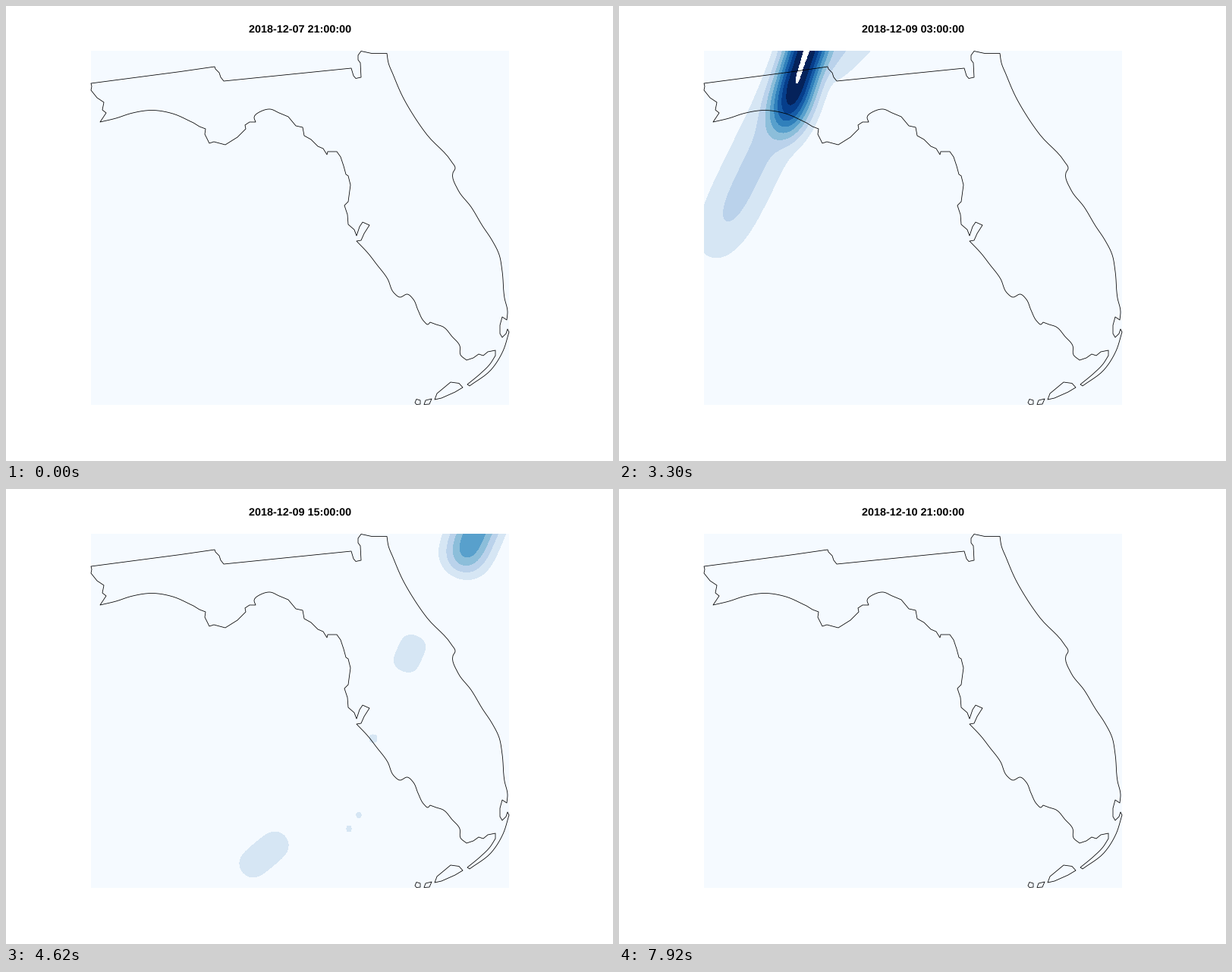
A matplotlib script for the animation above (8000 ms loop, 800 px wide and 600 px high).

```python
import numpy as np
import matplotlib.pyplot as plt
from matplotlib.animation import FuncAnimation
from matplotlib.patches import Polygon

plt.rcParams["text.hinting"] = "none"

W, H, DPI = 800, 600, 100
LOOP, TICK, HOLD = 8000, 40, 330
STEPS = LOOP // HOLD + 1
PX = 72 / DPI
BLUES = ["#f5faff", "#d6e6f4", "#bad2eb", "#8cbeda", "#58a0cc",
         "#3080bb", "#165ca7", "#063e8b", "#05225a", "#ffffff"]
LEVELS = [-1, *range(1, 10), 99]

fig = plt.figure(figsize=(W / DPI, H / DPI), dpi=DPI, facecolor="white")
ax = fig.add_axes([0, 0, 1, 1])

# ---- rain: drifting cells, each with keys (step, x, y, across, along, tilt, peak) ----
front = [(7, 31, 68, 20, 88, 17, 9), (10, 244, 68, 20, 88, 17, 9.03),
         (12, 419, 62, 18.5, 55, 10, 6.4), (13, 486, 56, 18, 54, 15, 5),
         (14, 621, 50, 21.5, 54, 23, 4.85), (16, 740, 30, 20, 50, 23, 1)]
flare = [(7, 79, 45, 30, 48, 45, 2.2), (10, 292, 45, 30, 48, 45, 2.2),
         (11, 380, 45, 30, 48, 45, 0)]
tail = [(7, -35, 208, 29, 120, 26, 2.25), (10, 178, 208, 29, 120, 26, 2.25),
        (11, 225, 255, 30, 130, 28, 2.3), (12, 241, 250, 28, 52, 20, 3.05),
        (14, 532, 217, 22, 28, 24, 1.35), (16, 650, 180, 20, 26, 24, 1.2)]
strip = [(11, 270, 110, 25, 80, 12, 0), (12, 318, 110, 25, 80, 12, 2.1),
         (13, 366, 110, 25, 80, 12, 0)]
streak = [(11, 300, 225, 25, 62, 38, 0), (12, 362, 200, 25, 62, 38, 1.6),
          (13, 420, 185, 25, 62, 38, 1.4), (14, 480, 170, 25, 62, 38, 0)]
south = [(11, 230, 560, 23, 40, 50, 1.4), (12, 282, 518, 25, 30, 50, 1.4),
         (14, 340, 482, 23, 40, 50, 1.4), (16, 400, 478, 18, 24, 50, 1.2)]
east = [(15, 640, 370, 15, 20, 20, 0), (16, 650, 360, 15, 20, 20, 1.3),
        (17, 660, 346, 15, 20, 20, 1.3)]
specks = [[(13, x, y, s, s, 0, 0), (14, x, y, s, s, 0, 1.4), (15, x, y, s, s, 0, 0)]
          for x, y, s in [(484, 329, 6), (465, 430, 4), (452, 448, 4)]]
CELLS = [front, flare, tail, strip, streak, south, east, *specks]

X, Y = np.meshgrid(np.linspace(112, 663, 185), np.linspace(59, 526, 157))


def rain(step):
    field = np.zeros_like(X)
    for keys in CELLS:
        t, *cols = np.array(keys, float).T
        if not t[0] <= step <= t[-1]:
            continue
        x, y, across, along, tilt, peak = (np.interp(step, t, c) for c in cols)
        s, c = np.sin(np.radians(tilt)), np.cos(np.radians(tilt))
        u = ((X - x) * s - (Y - y) * c) / along
        v = ((X - x) * c + (Y - y) * s) / across
        # bell across the cell, flat-topped along it
        field = np.hypot(field, peak * np.exp(-(v**2 + u**4) / 2))
    return field


maps = [ax.contourf(X, Y, rain(k), levels=LEVELS, colors=BLUES, zorder=1)
        for k in range(STEPS)]


# ---- coastline ----
def curve(*pts, n=6):
    """Smooth line through the points, n pieces per span."""
    p = np.array(pts, float)
    t = np.r_[0, np.cumsum(np.hypot(*np.diff(p, axis=0).T))]
    m = np.gradient(p, t, axis=0)
    q = np.linspace(0, len(p) - 1, (len(p) - 1) * n + 1)
    i = np.minimum(q.astype(int), len(p) - 2)
    f, h = (q - i)[:, None], np.diff(t)[i][:, None]
    ease = f * f * (3 - 2 * f)
    return (p[i] * (1 - ease) + p[i + 1] * ease
            + h * f * (1 - f) * (m[i] * (1 - f) - m[i + 1] * f))


coast = np.vstack([
    # northern border and St. Marys River
    [(112, 102), (230, 86.5), (275, 80), (276, 83), (281, 88), (283, 94), (287, 99),
     (455, 82), (458, 92), (461, 95.5), (468, 94), (467, 75), (464, 71), (464, 65),
     (468, 59.5), (482, 62.5)],
    # Atlantic
    curve((502, 62.5), (504, 75), (510, 90), (523, 120), (535, 141), (555, 170),
          (587, 205), (592, 214), (589, 220), (596, 243), (613, 265), (628, 290),
          (640, 308), (650, 328), (654, 350), (657, 385), (661, 403), (660, 414)),
    # southern tip
    [(654, 410), (651, 421), (651, 432), (654, 437), (659, 432), (661, 426)],
    curve((663, 430), (655, 455), (639, 480), (611, 501)),
    curve((608, 499), (625, 485), (638, 472), (645, 461)),
    [(645, 454), (635, 456), (629, 461), (623, 459), (616, 464)],
    # south-west coast
    curve((607, 467), (599, 460), (598, 448), (588, 436), (576, 423), (567, 420)),
    curve((559, 417), (556, 420), (551, 416), (543, 401), (537, 387), (529, 380),
          (519, 384), (511, 378), (503, 360), (488, 340), (478, 327), (462, 310)),
    # Tampa Bay
    [(468, 309), (472, 300), (479, 289), (470, 285), (466, 291), (462, 303),
     (459, 295), (451, 288)],
    # Big Bend
    [(450, 275), (446, 263), (451, 258), (454, 236), (451, 224), (448, 222), (445, 211),
     (441, 199), (436, 192), (424, 192), (423, 196), (418, 188), (411, 185), (402, 176),
     (393, 171), (391, 160), (382, 158)],
    curve((372, 146), (360, 141), (348, 136), (338, 138), (327, 147), (329, 153)),
    [(321, 153), (315, 157), (316, 162), (305, 173), (289, 183), (274, 179), (268, 181),
     (262, 169), (263, 162), (255, 159)],
    # panhandle
    curve((247, 154), (220, 142), (193, 137.5), (165, 141.5), (145, 148), (124, 153)),
    [(132, 141), (127, 137), (129, 127), (120, 121), (112, 111), (113, 106)],
])
keys = [[(565, 519), (568, 511), (586, 496), (597, 497.5), (602, 503), (592, 509), (574, 517)],
        [(551, 525.5), (553, 520), (561, 518), (558, 525)],
        [(539, 523), (541, 518.5), (546, 520), (546, 525), (541, 525.5)]]

for shore in [coast, *keys]:
    ax.add_patch(Polygon(shore, fill=False, ec="black", lw=0.8 * PX,
                         joinstyle="round", zorder=3))

title = ax.text(387.5, 35, "", ha="center", va="baseline", color="black",
                family="Liberation Sans", weight="bold", size=14.4 * PX)
ax.set(xlim=(0, W), ylim=(H, 0))
ax.axis("off")


def update(i):
    now = (i * TICK + 30) // HOLD
    hours = 21 + 3 * now
    title.set_text(f"2018-12-{7 + hours // 24:02d} {hours % 24:02d}:00:00")
    for k, layer in enumerate(maps):
        layer.set_visible(k == now)
    return [title]


anim = FuncAnimation(fig, update, frames=LOOP // TICK, interval=TICK,
                     repeat=True, repeat_delay=0, blit=False)
plt.show()
```
